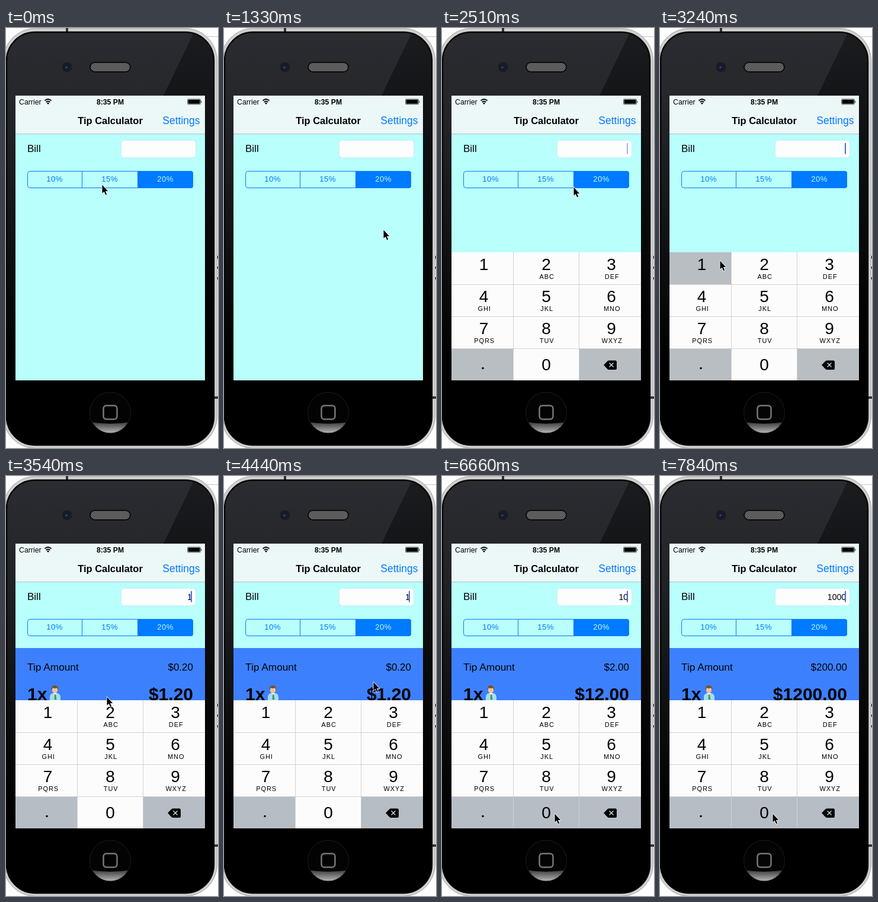
Recreate the animation shown at these times as an HTML page. Size 358 px wide and 708 px high, loop 7.99 s.

```html
<!DOCTYPE html>
<html lang="en">
<head>
<meta charset="utf-8">
<title>Tip Calculator</title>
<style>
  html, body { margin: 0; width: 100%; height: 100%; overflow: hidden; background: #fdfdfd; }
  svg { display: block; width: 358px; height: 708px; font-family: "Liberation Sans", Arial, sans-serif; }
  .mid { text-anchor: middle; }
  .end { text-anchor: end; }
  .bold { font-weight: bold; }
  .seg { font-size: 13.2px; letter-spacing: .4px; fill: #007aff; }
  .digit { font-size: 28px; }
  .abc { font-size: 11px; letter-spacing: .9px; }
</style>
</head>
<body>
<svg viewBox="0 0 358 708">
  <defs>
    <linearGradient id="body" x1="0" y1="0" x2="0" y2="1">
      <stop offset="0" stop-color="#2b2c31"/>
      <stop offset=".16" stop-color="#26272b"/>
      <stop offset=".5" stop-color="#111214"/>
      <stop offset=".8" stop-color="#000"/>
    </linearGradient>
    <linearGradient id="shade" x1="0" y1="0" x2="0" y2="1">
      <stop offset="0" stop-color="#1b1c1f"/>
      <stop offset=".4" stop-color="#0d0e10"/>
      <stop offset="1" stop-color="#000"/>
    </linearGradient>
    <linearGradient id="glow" x1="0" y1="0" x2="0" y2="1">
      <stop offset="0" stop-color="#383838"/>
      <stop offset="1" stop-color="#bdbdbd"/>
    </linearGradient>
    <pattern id="mesh" width="3" height="3" patternUnits="userSpaceOnUse">
      <path d="M0 0h3v3h-3z" fill="#858585"/>
      <path d="M0 0h1.5v1.5h-1.5zM1.5 1.5h1.5v1.5h-1.5z" fill="#333"/>
    </pattern>
    <clipPath id="case"><rect x="1" y="7" width="350" height="696" rx="48"/></clipPath>
    <clipPath id="screen"><rect x="16" y="114" width="320" height="480"/></clipPath>
    <clipPath id="home"><circle cx="176" cy="648.500" r="34"/></clipPath>
  </defs>

  <!-- phone -->
  <path d="M330 14.500H358" stroke="#c4c4c4"/>
  <path d="M357 384v5M357 402v4M357 420v4" stroke="#222" stroke-width="2"/>
  <rect x="-4.500" y=".5" width="361" height="708" rx="54" fill="#cfcfcf" stroke="#a6a6a6"/>
  <path d="M101 0h4v6h-4zM0 621h3v4h-3zM350 621h8v4h-8z" fill="#333"/>
  <g clip-path="url(#case)">
    <rect y="6" width="352" height="698" fill="url(#body)"/>
    <path d="M318 6H352V560H336V114H266Z" fill="url(#shade)"/>
  </g>
  <rect x="1" y="7" width="350" height="696" rx="48" fill="none" stroke="#050505" stroke-width="2.500"/>
  <circle cx="103" cy="66" r="9" fill="#1a1b20" stroke="#2c2d32" stroke-width=".8"/>
  <circle cx="103" cy="66" r="5" fill="#141c33"/>
  <circle cx="102" cy="66.500" r="1.600" fill="#2a4c96"/>
  <rect x="142" y="58" width="68" height="16" rx="8" fill="url(#mesh)" stroke="#0c0c0d" stroke-width="2"/>
  <circle cx="176" cy="648.500" r="34.500" fill="#030303" stroke="#1c1c1c"/>
  <path clip-path="url(#home)" d="M140 664Q176 670 212 664V684H140Z" fill="url(#glow)"/>
  <rect x="164.500" y="636.500" width="23" height="23" rx="5" fill="none" stroke="#787878" stroke-width="2.500"/>

  <g clip-path="url(#screen)">
    <rect x="16" y="114" width="320" height="480" fill="#b9fffc"/>
    <rect x="16" y="114" width="320" height="64" fill="#ecf7f8"/>
    <path d="M16 178.500H336" stroke="#a5c6c8"/>

    <!-- status and title -->
    <text x="22" y="129" font-size="12.300">Carrier</text>
    <g fill="none" stroke="#000" stroke-width="1.700">
      <path d="M65.500 122.500Q71 117.500 76.500 122.500M67.700 125Q71 122 74.300 125"/>
    </g>
    <path d="M69 126.500Q71 124.800 73 126.500L71 129Z"/>
    <text class="mid bold" x="176" y="129" font-size="12.200">8:35 PM</text>
    <rect x="306.500" y="119.800" width="22" height="9" rx="1.500" fill="none" stroke="#000" stroke-width=".6"/>
    <rect x="307.500" y="120.800" width="20" height="7" rx=".8"/>
    <path d="M329.500 122.500q2 2 0 4z"/>
    <text class="mid bold" x="176" y="162" font-size="16.500">Tip Calculator</text>
    <text class="end" x="327.500" y="162" font-size="17.500" fill="#007aff">Settings</text>

    <!-- bill row and rates -->
    <text x="36" y="209" font-size="17">Bill</text>
    <rect x="194.500" y="189.500" width="126" height="29" rx="5" fill="#fcfefe" stroke="#d6eaea"/>
    <text id="bill" class="end" x="314" y="209" font-size="14"></text>
    <rect id="caret" x="312" y="194" width="2" height="18.500" fill="#4668e8"/>
    <path d="M222 241H312a4 4 0 0 1 4 4V266a4 4 0 0 1 -4 4H222Z" fill="#007aff"/>
    <rect x="36.500" y="241.500" width="279" height="28" rx="4" fill="none" stroke="#007aff"/>
    <path d="M128.500 241V270" stroke="#007aff"/>
    <text class="mid seg" x="82" y="259">10%</text>
    <text class="mid seg" x="175" y="259">15%</text>
    <text class="mid seg" x="269" y="259" style="fill:#b9fffc">20%</text>

    <!-- result panel -->
    <g id="panel">
      <rect x="16" y="290" width="320" height="304" fill="#3d80fe"/>
      <text x="36" y="328" font-size="17.300">Tip Amount</text>
      <text id="tip" class="end" x="316" y="328" font-size="17"></text>
      <text class="bold" x="36" y="378" font-size="30">1x</text>
      <path d="M74 379V373Q74 367 80 366H86Q92 367 92 373V379Z" fill="#a8dcf0"/>
      <path d="M80 366L83 370L86 366Z" fill="#fff"/>
      <path d="M82 368h2l1.500 9h-4z" fill="#3f9a58"/>
      <ellipse cx="82.500" cy="360.500" rx="4.700" ry="5.500" fill="#f3c39b"/>
      <path d="M77 361Q76 353 82 353Q89 353 88 361L86 357Q82 359 79 357Z" fill="#76502f"/>
      <text id="total" class="end bold" x="316" y="378" font-size="30"></text>
    </g>

    <g id="keys"></g>
  </g>

  <path id="cursor" d="M.5 .5V14.500L3.700 11.700L6.200 17.300L8.200 16.400L5.900 11H10.200Z"
        stroke="#fff" stroke-width="1.600" stroke-linejoin="round" paint-order="stroke"/>
</svg>
<script>
const LOOP = 7990;
const KEYS_TOP = 378;
const $ = id => document.getElementById(id);

// Each track holds its value until the next time in ms.
const cursorTrack = [
  [0, 162, 264], [150, 145, 258], [300, 190, 375], [440, 258, 462], [590, 272, 478],
  [1180, 272, 430], [1330, 269, 340], [1480, 263, 255], [1620, 259, 214], [1770, 258, 206],
  [2360, 254, 216], [2510, 222, 268], [2660, 162, 342], [2810, 114, 384], [2950, 101, 392],
  [3540, 170, 372], [3840, 215, 358], [3990, 241, 350], [4140, 252, 347],
  [4580, 246, 390], [4730, 225, 475], [4880, 202, 552], [5030, 194, 565], [5180, 191, 569],
  [6070, 190, 569]
];
const caretTrack = [
  [0, 0], [2070, 1], [2510, .5], [2660, 0], [2950, 1], [3840, .5], [3990, 0], [4290, 1],
  [4880, .5], [5030, 0], [5330, 1], [7260, .5], [7400, 0], [7700, 1]
];
const keysTrack = [[0, 594], [2210, 522], [2360, 391], [2510, KEYS_TOP]];
const pressTrack = [[0, ""], [3240, "1"], [3390, ""], [5920, "0"], [6070, ""],
  [6660, "0"], [6810, ""], [7700, "0"]];
const billTrack = [[0, ""], [3390, "1"], [6070, "10"], [6810, "100"], [7840, "1000"]];
const panelTrack = [[0, 0], [3390, .5], [3540, 1]];

function at(track, t) {
  let step = track[0];
  for (const next of track) {
    if (next[0] > t) break;
    step = next;
  }
  return step.slice(1);
}

// Keypad
const columns = [16, 121, 231, 336];
const rows = [378, 432, 486, 540, 594];
const centers = [70.5, 176, 286];
const labels = "123456789.0<";
const letters = ["", "ABC", "DEF", "GHI", "JKL", "MNO", "PQRS", "TUV", "WXYZ"];
const caps = {};

function add(tag, attrs, text = "") {
  const node = document.createElementNS("http://www.w3.org/2000/svg", tag);
  for (const name in attrs) node.setAttribute(name, attrs[name]);
  node.textContent = text;
  $("keys").append(node);
  return node;
}

[...labels].forEach((label, i) => {
  const col = i % 3, row = Math.floor(i / 3);
  const x = columns[col], y = rows[row];
  caps[label] = add("rect", { x, y, width: columns[col + 1] - x, height: rows[row + 1] - y });
  if (label === "<") {
    add("path", { d: "M273 568L279.500 561.500Q280.500 560.500 282 560.500H292.500Q295 560.500 295 563V573.500Q295 576 292.500 576H282Q280.500 576 279.500 575Z" });
    add("path", { d: "M282.500 564.500l7 7m0-7l-7 7", stroke: "#dfe2e6", "stroke-width": 1.4 });
    return;
  }
  if (label === ".") {
    add("rect", { x: 67.5, y: 572, width: 3, height: 3 });
    return;
  }
  const base = row === 3 ? 577 : y + 29.5;
  add("text", { class: "mid digit", x: centers[col], y: base }, label);
  if (letters[i]) add("text", { class: "mid abc", x: centers[col] + 1.2, y: y + 45 }, letters[i]);
});
add("path", {
  d: "M16 432.500H336M16 486.500H336M16 540.500H336M120.500 378V594M231.500 378V594",
  stroke: "#ced2d5", fill: "none"
});

function draw(t) {
  const [x, y] = at(cursorTrack, t);
  const [keysY] = at(keysTrack, t);
  const [pressed] = at(pressTrack, t);
  const [bill] = at(billTrack, t);
  const [shown] = at(panelTrack, t);
  const money = value => "$" + value.toFixed(2);

  $("cursor").setAttribute("transform", `translate(${x} ${y})`);
  $("caret").setAttribute("opacity", at(caretTrack, t)[0]);
  $("keys").setAttribute("transform", `translate(0 ${keysY - KEYS_TOP})`);
  $("panel").setAttribute("opacity", shown);
  $("bill").textContent = bill;
  $("tip").textContent = money(bill * .2);
  $("total").textContent = money(bill * 1.2);

  const gray = shown ? "#b7bdc5" : "#b8bec1";
  for (const label in caps) {
    const isGray = label === "." || label === "<" || label === pressed;
    caps[label].setAttribute("fill", isGray ? gray : "#fcfcfd");
  }
}

const start = performance.now();
function tick() {
  draw((performance.now() - start) % LOOP);
  requestAnimationFrame(tick);
}
tick();
</script>
</body>
</html>
```
